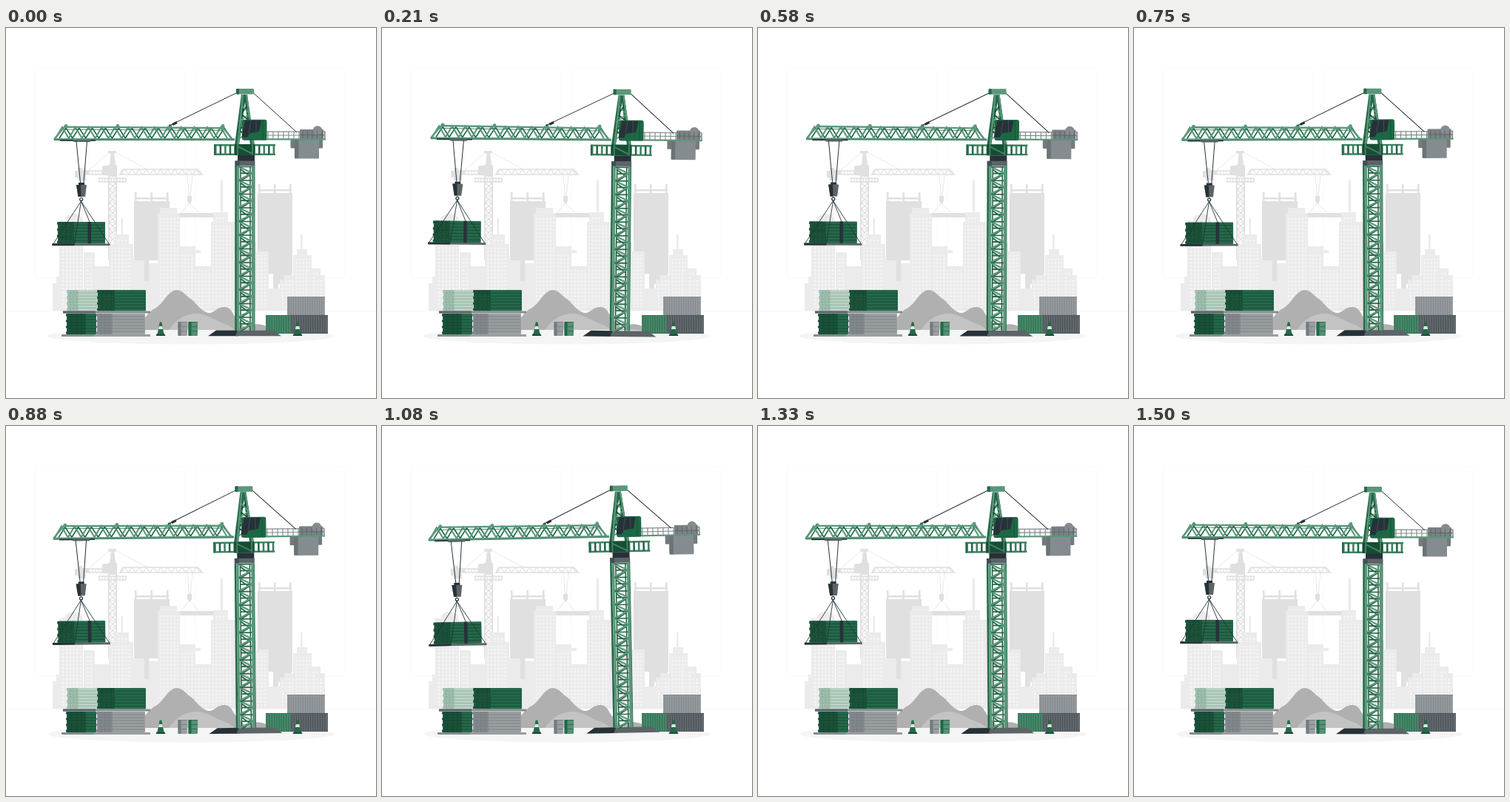
An HTML page for the animation above (1540 ms loop, 500x500 px).

```html
<!DOCTYPE html>
<html lang="en">
<head>
<meta charset="utf-8">
<title>Tower crane in the wind</title>
<style>
  html, body { margin: 0; width: 100%; height: 100%; overflow: hidden; background: #fff; }
  svg { display: block; width: 100vw; height: 100vh; }
</style>
</head>
<body>
<svg id="stage" viewBox="0 0 500 500"></svg>
<script>
const LIGHT = '#5b977a', GREEN = '#24694a', DEEP = '#174d34', INK = '#263238', STEEL = '#5c6468', GREY = '#858c8f';
const PALE = '#ebebeb', MIST = '#e0e0e0';

const rect = (x, y, w, h, fill, rx = 0) =>
  `<rect x="${x}" y="${y}" width="${w}" height="${h}" rx="${rx}" fill="${fill}"/>`;
const shape = (d, fill) => `<path d="${d}" fill="${fill}"/>`;
const line = (d, stroke, width = 1) =>
  `<path d="${d}" fill="none" stroke="${stroke}" stroke-width="${width}"/>`;
const times = (n, make) => Array.from({ length: n }, (_, i) => make(i)).join('');

// Zigzag between two horizontal chords, starting at the bottom.
const zigzag = (x0, x1, top, bottom, n) =>
  times(n + 1, i => `${i ? 'L' : 'M'}${x0 + (x1 - x0) * i / n},${i % 2 ? top : bottom}`);

const building = (x, y, w, windows = true, bottom = 382) =>
  rect(x, y, w, bottom - y, PALE) +
  (windows ? rect(x + 2, y + 5, w - 4, bottom - y - 9, 'url(#windows)') : '');

function darkTower(x, y, w, bottom) {
  const posts = times(3, i => rect(x + 1 + i * (w - 5) / 2, y - 12, 2.5, 13, MIST));
  return rect(x, y, w, bottom - y, MIST) + posts + rect(x + 1, y - 5, w - 2, 2.5, MIST);
}

function city() {
  return darkTower(173, 234, 48, 314) + rect(187, 312, 6.5, 30, MIST) +
    darkTower(340, 223, 47, 332) + rect(361, 330, 7, 22, MIST) + rect(368, 330, 18, 16, MIST) +
    building(63, 345, 12, false) + building(68, 336, 8, false) +
    shape('M80,262V256Q91,246 103,256V262Z', PALE) + building(72, 260, 32) +
    building(105, 303, 15) + building(120, 322, 20, false) +
    rect(155.5, 257, 2.5, 24, PALE) + building(147, 279, 19) + building(139, 292, 33) +
    building(171, 314, 16, false) + building(187, 342, 18, false) + building(193, 318, 13, false) +
    building(208, 243, 23) + building(205, 250, 30) +
    building(235, 295, 21) + rect(235, 300, 28, 4, PALE) + building(253, 322, 25) +
    rect(290, 206, 3, 45, PALE) + building(280, 249, 20) + building(277, 262, 32) +
    building(308, 290, 30, false) + building(336, 302, 19) + building(354, 352, 18, false) +
    rect(398, 279, 2.5, 22, PALE) + building(393, 299, 14) + building(388, 307, 25) +
    building(411, 325, 14) + building(370, 340, 22) + building(376, 334, 14) + building(418, 334, 13);
}

function distantCrane() {
  const lattice = times(12, i => {
    const y = 209 + i * 9;
    return `M139,${y}H149L139,${y + 9}M139,${y}L149,${y + 9}`;
  });
  return line('M139,185V314M149,185V314', MIST, 2) + line(lattice, MIST, 1.2) +
    shape('M138,201L142,168H146L150,201Z', MIST) + rect(138, 166, 11, 3.5, MIST) +
    rect(130, 186, 17, 13, MIST, 2) +
    line('M154,198H265L259,191H158Z', MIST, 1.7) + line(zigzag(156, 262, 191, 198, 22), MIST, 1.2) +
    line('M96,198H138M108,193H134', MIST, 1.3) +
    line(times(7, i => `M${109 + i * 4},193V198`), MIST) +
    shape('M93,193H97V189H103V192H112V198H108V206H97V202H93Z', MIST) +
    line('M125,203H163M125,208H163', MIST, 1.5) +
    line(times(10, i => `M${126 + i * 4},203V208`), MIST, 1.4) +
    line('M140,168L111,193M148,168L191,191', MIST, .7) +
    line('M245,199L247.5,227M252,199L249,227M248,236L236,251M248,236L262,251', MIST, .8) +
    shape('M245,227H251V234L249,237H247L245,234Z', MIST) + rect(234, 250, 48, 6, MIST);
}

function mounds() {
  return shape('M180,408C186,392 192,384 201,379C212,374 219,354 231,354C239,354 244,363 251,367' +
      'C258,373 263,382 273,385C282,386 284,377 295,377C305,377 305,386 313,394C319,400 322,405 327,408Z', '#b0b0b0') +
    shape('M220,408C228,396 240,387 254,386C270,385 280,394 296,400C302,402 306,405 309,408Z', '#c3c3c3') +
    shape('M325,408C333,397 345,400 354,404C360,407 364,407 367,409Z', '#b0b0b0');
}

// Pile of sheets: ragged end face on the left, long side on the right.
function pile(x, y, w, h, end, side, face, seam) {
  const rows = 7, step = h / rows;
  return rect(x + end - 2, y, w - end + 2, h, side, 1) +
    times(rows, i => rect(x + (i % 2), y + i * step, end - (i % 2), step, face, 1.4)) +
    line(times(rows - 1, i => `M${x + 1},${y + (i + 1) * step}H${x + w - 1}`), seam, .8) +
    line(times(3, i => {
      const px = x + (i + 1) * end / 4;
      return `M${px},${y}` + times(rows, k => `l${k % 2 ? -2 : 2},${step}`);
    }), seam, .8);
}

function storage() {
  return pile(82, 354, 42, 28.5, 16, '#bad2c6', '#a2c0b1', '#88ac9a') +
    pile(123, 354, 66, 28.5, 24, GREEN, '#19523a', '#16442f') +
    rect(77, 382.5, 118, 3, GREY) + rect(77, 382.5, 44, 3, STEEL) +
    pile(81, 386, 41, 28, 27, GREEN, '#19523a', '#16442f') +
    pile(122, 386, 66, 28, 22, '#9b9fa1', '#83898c', '#747b7e') +
    rect(75, 414, 120, 3, '#9b9fa1') + rect(75, 414, 44, 3, GREY);
}

const container = (x, y, w, h, fill, rib) =>
  rect(x, y, w, h, fill) +
  line(times(Math.floor(w / 3.2), i => `M${x + 2 + i * 3.2},${y + 1.5}V${y + h - 1.5}`), rib, 1.1) +
  line(`M${x},${y + .5}H${x + w}M${x},${y + h - .5}H${x + w}`, rib, 1);

const barrel = (x, fill, shade) =>
  rect(x, 397, 12.5, 19, fill, 1) + rect(x, 397, 4, 19, shade, 1) +
  line(`M${x},397.5h12.5M${x},403.5h12.5M${x},409.5h12.5`, shade, .8);

const cone = x =>
  shape(`M${x - 6.5},416l1.5,-3h10l1.5,3Z`, DEEP) +
  shape(`M${x - 4.5},414L${x - 1.3},397.5h2.6L${x + 4.5},414Z`, GREEN) +
  shape(`M${x - 3},407l.8,-4h4.4l.8,4Z`, '#dfe9e3');

function mast() {
  const panel = 18.5;
  return line('M317,187V409M330,187V409', DEEP, 1.4) +
    times(12, i => {
      const y = 187 + i * panel, mid = y + panel / 2, end = y + panel;
      return line(`M317,${y + 4}L330,${mid + 4}M330,${mid + 2}L317,${end + 1}M317,${mid}H331`, GREEN, 1.8) +
        line(`M314,${y}L333,${mid}L314,${end}`, LIGHT, 2.2) +
        line(`M313,${y + .5}H334`, GREEN, 1.6);
    }) +
    rect(309.3, 186, 2.6, 223, GREEN) + rect(311.9, 186, 3.4, 223, LIGHT) +
    rect(331.8, 186, 4, 223, LIGHT) + line('M336,186V409', GREEN, .9);
}

function jib() {
  return line(zigzag(72, 304, 135, 149, 26), GREEN, 1.7) +
    line(zigzag(67, 299, 134, 149, 26), LIGHT, 2.1) +
    line('M80,137L293,138.5', GREEN, .8) +
    line('M65.5,149.8L79,133.6L293.5,135.2L305.5,149.8', LIGHT, 2.4) +
    line('M64.5,150.2H309', LIGHT, 2.6) + line('M65,151.5H309', GREEN, .8) +
    [81, 151, 222, 293].map(x => `<circle cx="${x}" cy="132.5" r="2.4" fill="${LIGHT}"/>`).join('') +
    rect(73, 151, 48, 1.8, INK) + rect(91, 151, 23, 3, STEEL);
}

function load() {
  return pile(69, 262, 65, 29.5, 23, GREEN, '#19523a', '#16442f') + rect(110.5, 262, 4.5, 29.5, INK) +
    rect(62.5, 291.3, 78, 2.8, STEEL) + rect(62.5, 291.3, 30, 2.8, INK) +
    line('M95,153L100.5,209M109.5,153L105,209', INK, 1) +
    line('M101.5,234L64,291.5M101.5,234L92.5,291.5M101.5,234L113,262M101.5,234L139,291.5', INK, .9) +
    shape('M98,209H106V213H98Z', INK) + shape('M95,212H109L107,228H97.5Z', STEEL) +
    shape('M95,212H101L101.5,228H97.5Z', INK) +
    `<circle cx="101.7" cy="231.5" r="2" fill="none" stroke="${INK}" stroke-width="1.2"/>`;
}

function counterJib() {
  return line('M352,140.2H431M352,145H431', GREY, 1.2) +
    line(times(12, i => `M${354 + i * 7},140V150`), GREY, 1.2) +
    rect(397, 137, 32, 13, '#7b8285', 1) + `<circle cx="421" cy="138.5" r="6.3" fill="${GREY}"/>` +
    line(times(5, i => `M${401 + i * 6.5},139V150`) + 'M397,144.5H430', STEEL, .9) +
    rect(384.5, 150, 43.5, 12.5, '#737a7d', 1) + rect(390, 150, 33, 26.5, GREY, 1) +
    rect(390, 150, 5.5, 26, '#6b7376', 1) +
    line('M350,150.3H432', LIGHT, 2.2) + line('M430.5,139V151', GREY, 1.3);
}

function towerHead() {
  const rail = '#3f8061';
  const posts = times(13, i => rect(282 + i * 6.55, 158, 2.6, 13, i % 2 ? GREEN : rail));
  return line('M312,87.5L228,128.3L220,132.5M334,87.5L393,141', INK, 1) +
    line('M225,130.5L231,127.5', INK, 3.2) +
    shape('M318,90H326L336,158H330L323,100L315,158H309Z', GREEN) +
    line('M327,104L317,116L330,126L314,138L333,150', DEEP, 2) +
    line('M319,105L329,116L316,126L332,138L313,151', LIGHT, 1.7) +
    line('M320,90L313.5,158M325,90L334,158', LIGHT, 2.2) +
    rect(311, 82, 24, 7.5, LIGHT, 1) + rect(311, 82, 4, 7.5, GREEN, 1) +
    line('M281.5,158.3H364M281.5,170.7H364', rail, 2.4) + posts +
    rect(281, 157.3, 2.4, 14.5, GREEN) + rect(309, 157, 27, 15, DEEP) +
    line('M313,157V172M333,157V172M313,160L333,170', rail, 2) +
    rect(313, 172, 23, 8, INK) + rect(309.5, 179.5, 27, 6.7, STEEL) + rect(309.5, 179.5, 6, 6.7, '#454e53') +
    rect(319, 123.7, 33.5, 28, '#1c6844', 3) +
    shape('M323,125H345L342,140L329,142L326,147.5H318.5Z', INK) +
    line('M331,125L328,142M338,125V140', '#46525a', .9) +
    line('M347,125V151', DEEP, .8);
}

const base = shape('M273,416.3L284,408.5H314V416.3Z', INK) +
  shape('M310,416.3L313,408.5H361L372,416.3Z', STEEL);

const frame = x =>
  `<rect x="${x}" y="55" width="203.5" height="282.6" rx="5.5" fill="none" stroke="${PALE}" stroke-width=".3"/>`;

document.getElementById('stage').innerHTML =
  `<defs><pattern id="windows" width="4.7" height="5" patternUnits="userSpaceOnUse">
    <rect x="1" y="1" width="2.6" height="2.8" fill="#f5f5f5"/></pattern></defs>` +
  frame(39) + frame(255) + line('M0,382.5H500', PALE, .4) +
  distantCrane() + city() +
  '<ellipse cx="250" cy="416.2" rx="193.9" ry="11.3" fill="#f5f5f5"/>' +
  mounds() + storage() +
  container(380, 363, 51, 25.5, '#979b9e', '#81878a') +
  container(351, 388, 33, 25, '#4b8a6b', '#2b6f50') +
  container(384, 388, 51, 25, '#626a6e', '#495257') +
  barrel(232.5, '#9a9ea0', '#757c7f') + barrel(246.5, '#559174', GREEN) + cone(209) + cone(394) +
  `<g id="crane">${base + mast() + counterJib() + jib() + towerHead() + load()}</g>`;

const crane = document.getElementById('crane');
const LOOP = 1540, SWAY = 1500, STEP = 1000 / 24;

// Linear sway in degrees: 0, 1, -1, 0. The loop starts one step into it.
function swayAngle(step) {
  const p = (step + 1) * STEP % SWAY / SWAY;
  return p < .25 ? 4 * p : p < .75 ? 2 - 4 * p : 4 * p - 4;
}

function tick() {
  const step = Math.floor((performance.now() % LOOP + 5) / STEP) % 37;
  const angle = swayAngle(step) - swayAngle(0);  // the crane is drawn in its starting pose
  crane.setAttribute('transform', `rotate(${angle} 247.5 249)`);
  requestAnimationFrame(tick);
}
tick();
</script>
</body>
</html>
```
